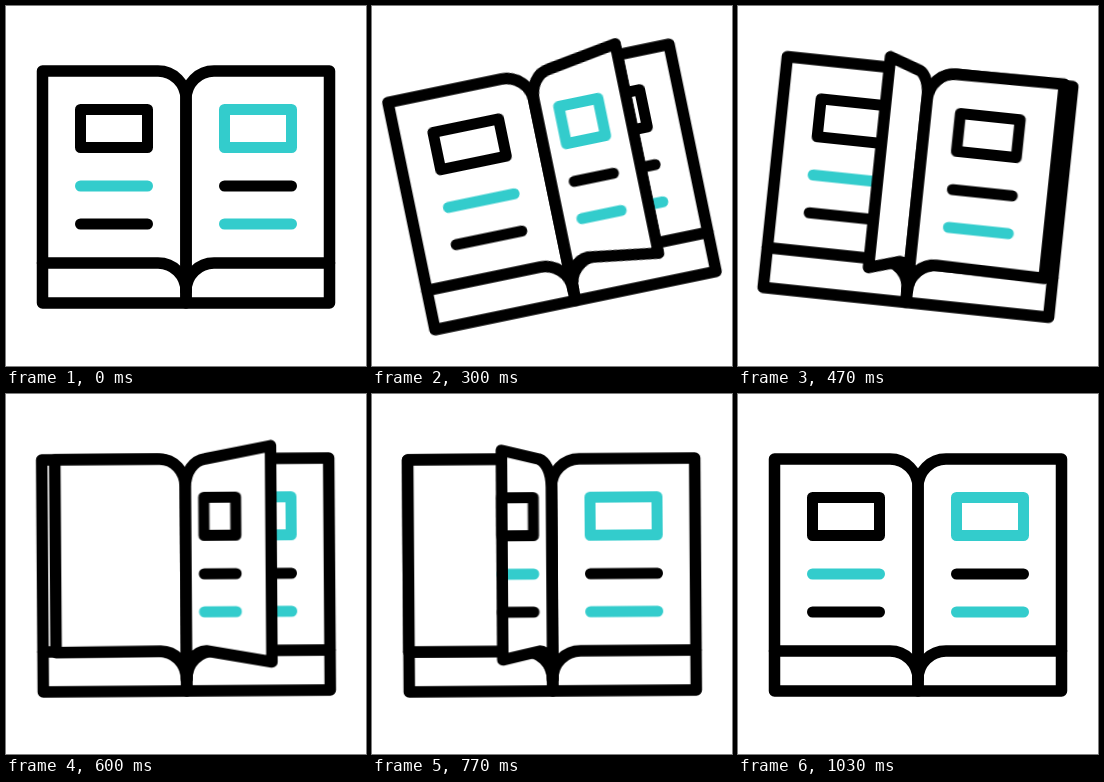
An HTML page without scripts for the animation above (1.67 s loop, 360 by 360 pixels).

```html
<!DOCTYPE html>
<html lang="en">
<head>
<meta charset="utf-8">
<title>Turning book</title>
<style>
  html, body { margin: 0; width: 100%; height: 100%; overflow: hidden; background: #fff; }
  svg { display: block; width: 100vw; height: 100vh; }

  svg {
    --ink: #000;
    --teal: #3cc;
    --t: 1.67s;
    fill: none;
    stroke: var(--ink);
    stroke-width: 11.5;
    stroke-linecap: round;
    stroke-linejoin: round;
  }
  .mark { stroke-width: 11; vector-effect: non-scaling-stroke; }
  .box { stroke: currentColor; }
  .line1 { stroke: var(--line1); }
  .line2 { stroke: var(--line2); }
  .right { color: var(--teal); --line1: var(--ink); --line2: var(--teal); }
  .left, .second { color: var(--ink); }
  .left { --line1: var(--teal); --line2: var(--ink); }

  .book { transform-origin: 180px 181px; animation: sway var(--t) cubic-bezier(.37, 0, .63, 1) infinite; }
  .under { animation: swap var(--t) step-end infinite; }

  .page { opacity: 0; animation: stay var(--t) step-end infinite; }
  .page.two { --lag: -1.38s; animation-name: pass; animation-delay: var(--lag); }
  .two .front { --lag: -1.4s; }
  .flap, .front, .back { animation: turn var(--t) linear var(--lag, 0s) infinite; }
  .sheet { fill: #fff; stroke: none; }
  .front { animation-name: fold; }
  .back { animation-name: unfold; }

  @keyframes sway {
    0%, 1.2% { transform: rotate(0deg); }
    15.57% { transform: rotate(-12deg); }
    17.07% { transform: rotate(-11.95deg); }
    29.94% { transform: rotate(6.8deg); }
    35.93%, 59.88% { transform: rotate(-.4deg); }
    61.4%, 100% { transform: rotate(0deg); }
  }
  @keyframes swap {
    0% { color: var(--teal); }
    7.78% { color: var(--ink); }
    25.15%, 100% { color: var(--teal); }
  }
  @keyframes stay {
    0% { opacity: 0; }
    7.78% { opacity: 1; }
    61.6%, 100% { opacity: 0; }
  }
  @keyframes pass {
    0% { opacity: 0; }
    7.78% { opacity: 1; }
    44.2%, 100% { opacity: 0; }
  }
  /* half a turn of the page, every 30 degrees */
  @keyframes turn {
    0%, 7.78% { d: path("M180 93C180 77.5 192.5 65 208 65L323.5 65L323.5 257L208 257C192.5 257 180 269.5 180 285Z"); }
    14.37% { d: path("M180 93C180 77.5 191 65 205 65L305 62L305 261L205 257C191 257 180 269.5 180 285Z"); }
    20.06% { d: path("M180 93C180 77.5 188 67 198 65L252 49L252 271L198 257C188 257 180 269.5 180 285Z"); }
    25.45% { d: path("M180 93C180 77.5 180 69 180 65L180 47L180 269L180 257C180 257 180 269.5 180 285Z"); }
    30.3% { d: path("M180 93C180 77.5 172 67 162 65L108 60L108 264L162 257C172 257 180 269.5 180 285Z"); }
    34.43% { d: path("M180 93C180 77.5 169 65 155 65L53 65L53 258L155 257C169 257 180 269.5 180 285Z"); }
    41.92%, 100% { d: path("M180 93C180 77.5 167.5 65 152 65L36.5 65L36.5 257L152 257C167.5 257 180 269.5 180 285Z"); }
  }
  @keyframes fold {
    0%, 7.78% { transform: scaleX(1); opacity: 1; }
    14.37% { transform: scaleX(.84); }
    20.06% { transform: scaleX(.46); }
    25.44% { transform: scaleX(.01); opacity: 1; }
    25.45%, 100% { transform: scaleX(.01); opacity: 0; }
  }
  @keyframes unfold {
    0%, 25.44% { transform: scaleX(.01); opacity: 0; }
    25.45% { transform: scaleX(.01); opacity: 1; }
    28.75% { transform: scaleX(.47); }
    30.3% { transform: scaleX(.59); }
    34.43% { transform: scaleX(.88); }
    41.92%, 100% { transform: scaleX(1); opacity: 1; }
  }
</style>
</head>
<body>
<svg viewBox="0 0 360 360">
  <defs>
    <!-- page marks, measured from the spine -->
    <g id="marks">
      <path class="mark line1" d="M38.5 180H105.5"/>
      <path class="mark line2" d="M38.5 218H105.5"/>
      <rect class="mark box" x="38.5" y="103.5" width="67" height="38"/>
    </g>
    <g id="half">
      <path d="M0 93A28 28 0 0 1 28 65H143.5V297H0Z"/>
      <path d="M143.5 257H28A28 28 0 0 0 0 285"/>
    </g>
  </defs>

  <g class="book">
    <g transform="translate(180 0)">
      <use href="#half"/>
      <use href="#half" transform="scale(-1 1)"/>
      <use class="left" href="#marks" transform="scale(-1 1)"/>
      <use class="right under" href="#marks"/>
    </g>

    <g class="page">
      <path class="flap sheet" d="M180 93Z"/>
      <g transform="translate(180 0)">
        <g class="front"><use class="right" href="#marks"/></g>
      </g>
      <path class="flap" d="M180 93Z"/>
    </g>

    <g class="page two">
      <path class="flap sheet" d="M180 93Z"/>
      <g transform="translate(180 0)">
        <g class="front"><use class="right second" href="#marks"/></g>
        <g class="back"><use class="left" href="#marks" transform="scale(-1 1)"/></g>
      </g>
      <path class="flap" d="M180 93Z"/>
    </g>
  </g>
</svg>
</body>
</html>
```
